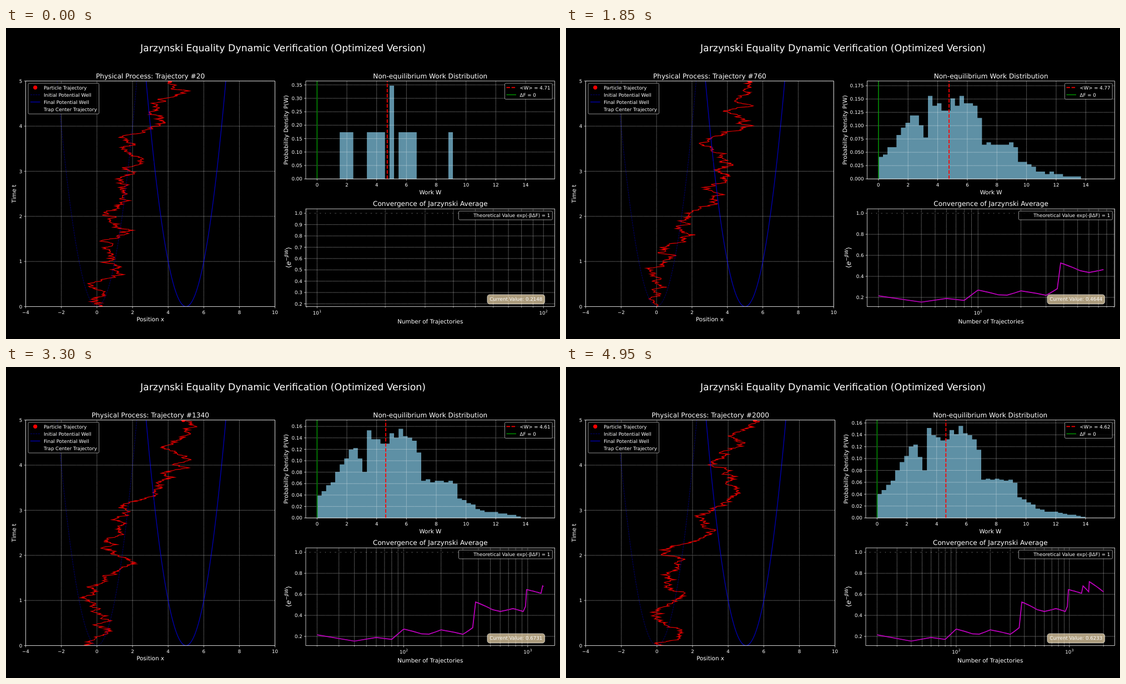
These frames come from a looping animation (998x561 px, 5 s). An HTML page with a canvas:

```html
<!DOCTYPE html>
<html lang="en">
<head>
<meta charset="utf-8">
<title>Jarzynski Equality Dynamic Verification</title>
<style>
html, body { margin: 0; height: 100%; overflow: hidden; background: #000; }
canvas { display: block; }
</style>
</head>
<body>
<canvas id="stage" width="998" height="561"></canvas>
<script>
const ctx = document.getElementById('stage').getContext('2d');
const STEPS = 100, STEP_MS = 50, BATCH = 20, BINS = 46, BIN = 0.304;
const PT = 998 / 16 / 72;   // a 16 inch wide figure
const SMALL = 10 * PT, LABEL = 12 * PT, TITLE = 14 * PT;
const TOP = 95.7, BOTTOM = 502.5;

// Key points [position, value], joined by straight lines.
const workShape = [[0, .04], [2, .053], [5, .093], [8, .13], [10, .08], [11, .15], [13, .13], [18, .15],
  [22, .118], [23, .068], [30, .06], [31, .036], [36, .013], [45, .002]];
const peakDensity = [[20, .347], [100, .2], [260, .176], [760, .175], [1040, .167], [1340, .163], [1720, .157], [2000, .157]];
const meanWork = [[20, 4.71], [520, 4.86], [1040, 4.66], [1340, 4.61], [2000, 4.62]];
const average = [[20, .2148], [40, .155], [60, .19], [80, .172], [100, .27], [150, .212], [200, .262], [300, .22],
  [360, .283], [380, .527], [520, .4543], [600, .437], [760, .4644], [920, .437], [960, .485], [980, .645],
  [1280, .61], [1320, .68], [1480, .625], [1500, .72], [2000, .6233]];

function along(points, at) {
  const i = Math.max(1, points.findIndex(([x]) => x >= at));
  const [x0, y0] = points[i - 1], [x1, y1] = points[i];
  return y0 + (y1 - y0) * (at - x0) / (x1 - x0);
}

function random(seed) {
  return () => {
    seed = (seed + 0x6D2B79F5) | 0;
    let v = Math.imul(seed ^ seed >>> 15, 1 | seed);
    v ^= v + Math.imul(v ^ v >>> 7, 61 | v);
    return ((v ^ v >>> 14) >>> 0) / 4294967296;
  };
}

// Overdamped particle in a harmonic trap whose centre moves at unit speed.
function trajectory(n) {
  const rand = random(n), dt = 0.01;
  const normal = () => 2 * (rand() + rand() + rand() - 1.5);
  let x = 0.7 * normal();
  return Array.from({ length: 501 }, (_, i) => {
    const here = x;
    x += 2 * (i * dt - x) * dt + Math.sqrt(2 * dt) * normal();
    return here;
  });
}

// Whole counts per bin, rough for few runs and smooth for many.
function workDensity(n) {
  const rand = random(11), runs = 0.945 * n * BIN, peak = along(peakDensity, n);
  return Array.from({ length: BINS }, (_, i) => {
    const expected = runs * along(workShape, i) * (1 + (2 * rand() - 1) * Math.sqrt(10 / n));
    return Math.min(peak, Math.floor(expected + rand()) / runs);
  });
}

function text(str, x, y, size = SMALL, align = 'center', style = '') {
  ctx.font = `${style} ${size}px "DejaVu Sans", sans-serif`;
  ctx.textAlign = align;
  ctx.fillStyle = '#fff';
  ctx.fillText(str, x, y + 0.365 * size);
}

function turned(x, y, draw) {
  ctx.save();
  ctx.translate(x, y);
  ctx.rotate(-Math.PI / 2);
  draw();
  ctx.restore();
}

function line(points, color, width, dash = []) {
  ctx.strokeStyle = color;
  ctx.lineWidth = width;
  ctx.setLineDash(dash);
  ctx.beginPath();
  points.forEach(([x, y]) => ctx.lineTo(x, y));
  ctx.stroke();
  ctx.setLineDash([]);
}

const dashes = width => [3.7 * width, 1.6 * width];
const number = (v, digits = 0) => v.toFixed(digits).replace('-', '\u2212');
const range = (from, to, step) =>
  Array.from({ length: Math.floor((to - from) / step + 1e-6) + 1 }, (_, i) => from + i * step);

function panel(left, top, right, bottom, [xMin, xMax], [yMin, yMax]) {
  return {
    left, top, right, bottom,
    x: v => left + (v - xMin) / (xMax - xMin) * (right - left),
    y: v => bottom - (v - yMin) / (yMax - yMin) * (bottom - top),
    clip(draw) {
      ctx.save();
      ctx.beginPath();
      ctx.rect(left, top, right - left, bottom - top);
      ctx.clip();
      draw();
      ctx.restore();
    }
  };
}

function gridX(p, v, tick = 3) {
  const x = p.x(v);
  line([[x, p.bottom], [x, p.top]], '#fff', 0.75, [0.75, 1.1]);
  line([[x, p.bottom], [x, p.bottom + tick]], '#fff', 0.7);
}

function gridY(p, v, digits) {
  const y = p.y(v);
  line([[p.left, y], [p.right, y]], '#fff', 0.75, [0.75, 1.1]);
  line([[p.left, y], [p.left - 3, y]], '#fff', 0.7);
  text(number(v, digits), p.left - 6.2, y, SMALL, 'right');
}

function frame(p, title, xLabel, labelY) {
  const middle = (p.left + p.right) / 2;
  ctx.strokeStyle = '#fff';
  ctx.lineWidth = 0.75;
  ctx.strokeRect(p.left, p.top, p.right - p.left, p.bottom - p.top);
  text(title, middle, p.top - 9.2, TITLE);
  text(xLabel, middle, labelY, LABEL);
}

function box(x, y, w, h, radius, fill, edge) {
  ctx.beginPath();
  ctx.roundRect(x, y, w, h, radius);
  ctx.fillStyle = fill;
  ctx.fill();
  ctx.strokeStyle = edge;
  ctx.lineWidth = PT;
  ctx.stroke();
}
const legend = (x, y, w, h) => box(x, y, w, h, 1.8, 'rgba(0,0,0,.8)', 'rgba(204,204,204,.8)');

function dot(x, y) {
  ctx.fillStyle = '#f00';
  ctx.beginPath();
  ctx.arc(x, y, 3.6, 0, 7);
  ctx.fill();
}

function drawProcess(n, right) {
  const p = panel(35.5, TOP, right, BOTTOM, [-4, 10], [0, 5]);
  for (const v of range(-4, 10, 2)) {
    gridX(p, v);
    text(number(v), p.x(v), 513);
  }
  for (const v of range(0, 5, 1)) gridY(p, v, 0);

  const well = center => range(-4, 10, 0.05).map(x => [p.x(x), p.y((x - center) ** 2)]);
  const initial = ['rgba(0,0,255,.5)', PT, dashes(PT)];
  const final = ['rgba(0,0,255,.72)', 1.5 * PT];
  const xs = trajectory(n);
  p.clip(() => {
    line(xs.map((x, i) => [p.x(x), p.y(i / 100)]), 'rgba(255,0,0,.9)', 1.2);
    dot(p.x(xs[500]), p.y(5));
    line(well(0), ...initial);
    line(well(5), ...final);
    line([[p.x(0), p.y(0)], [p.x(5), p.y(5)]], '#000', PT, [PT, 1.65 * PT]);
  });
  frame(p, 'Physical Process: Trajectory #' + n, 'Position x', 525.5);
  turned(14, 299, () => text('Time t', 0, 0, LABEL));

  legend(40, 99.7, 127.5, 55.3);
  dot(52.7, 107.3);
  line([[44, 120.5], [61.5, 120.5]], ...initial);
  line([[44, 133.5], [61.5, 133.5]], ...final);
  ['Particle Trajectory', 'Initial Potential Well', 'Final Potential Well', 'Trap Center Trajectory']
    .forEach((s, i) => text(s, 68, 107.4 + 13.05 * i, SMALL, 'left'));
}

function drawHistogram(n, left, yMax, step) {
  const p = panel(left, TOP, 988.6, 272.2, [-0.76, 15.96], [0, yMax]);
  const digits = step === 0.025 ? 3 : 2;
  ctx.fillStyle = 'rgb(94,144,165)';
  ctx.beginPath();
  workDensity(n).forEach((v, i) =>
    ctx.rect(p.x(i * BIN), p.y(v), p.x(BIN) - p.x(0), p.bottom - p.y(v)));
  ctx.fill();
  for (const v of range(0, 14, 2)) {
    gridX(p, v);
    text(number(v), p.x(v), 283);
  }
  for (const v of range(0, yMax, step)) gridY(p, v, digits);

  const mean = along(meanWork, n), width = 2 * PT;
  const meanLine = ['#f00', width, dashes(width)], zeroLine = ['#008000', width];
  const upright = v => [[p.x(v), p.bottom], [p.x(v), p.top]];
  line(upright(mean), ...meanLine);
  line(upright(0), ...zeroLine);
  frame(p, 'Non-equilibrium Work Distribution', 'Work W', 296);
  turned(digits === 3 ? 502 : 504.2, 184, () => text('Probability Density P(W)', 0, 0, LABEL));

  legend(898.5, 99.7, 85.7, 28.8);
  line([[901.5, 107.3], [919, 107.3]], ...meanLine);
  line([[901.5, 120.4], [919, 120.4]], ...zeroLine);
  text(`<W> = ${mean.toFixed(2)}`, 925.5, 107.4, SMALL, 'left');
  text('ΔF = 0', 925.5, 120.5, SMALL, 'left');
}

function powerLabel(x, factor, exponent) {
  const base = (factor > 1 ? factor + ' × ' : '') + '10';
  ctx.font = `${SMALL}px "DejaVu Sans", sans-serif`;
  const width = ctx.measureText(base).width, start = x - (width + 4.2) / 2;
  text(base, start, 514.3, SMALL, 'left');
  text(exponent, start + width + 0.4, 511, 0.7 * SMALL, 'left');
}

function drawAverage(n, left) {
  const runs = range(BATCH, n, BATCH), values = runs.map(run => along(average, run));
  const low = Math.min(...values), pad = (1 - low) * 0.05;
  const [from, to] = runs.length === 1 ? [1, 2] : [Math.log10(BATCH), Math.log10(n)];
  const margin = (to - from) * 0.05, xMin = from - margin, xMax = to + margin, span = xMax - xMin;
  const yMin = low - pad, yMax = 1 + pad;
  const p = panel(left, 326.2, 988.6, BOTTOM, [xMin, xMax], [yMin, yMax]);

  for (let exponent = 0; exponent < 4; exponent++) {
    for (let factor = 1; factor < 10; factor++) {
      const v = exponent + Math.log10(factor);
      if (v < xMin || v > xMax) continue;
      gridX(p, v, factor === 1 ? 3 : 1.7);
      const labelled = span <= 0.4 || span <= 1 && [2, 3, 4, 6].includes(factor);
      if (factor === 1 || labelled) powerLabel(p.x(v), factor, exponent);
    }
  }
  const step = (yMax - yMin) / 0.1 <= 9 ? 0.1 : 0.2;
  for (const v of range(Math.ceil(yMin / step) * step, yMax, step)) gridY(p, v, 1);

  line(values.map((v, i) => [p.x(Math.log10(runs[i])), p.y(v)]), '#bf00bf', 2 * PT);
  line([[p.left, p.y(1)], [p.right, p.y(1)]], '#000', 2 * PT, dashes(2 * PT));
  frame(p, 'Convergence of Jarzynski Average', 'Number of Trajectories', 529);
  turned(508.5, 414, () => {
    text('⟨', -19, 0, TITLE, 'left');
    text('e', -14.2, 0, TITLE, 'left', 'italic');
    text('\u2212βW', -6.6, -3.6, 0.7 * TITLE, 'left', 'italic');
    text('⟩', 19, 0, TITLE, 'right');
  });

  legend(815.5, 330.2, 168.8, 15.8);
  text('Theoretical Value exp(-βΔF) = 1', 980.3, 338, SMALL, 'right');
  box(867, 480.9, 103.6, 17, 4.3, 'rgba(245,222,179,.7)', 'rgba(255,255,255,.7)');
  text('Current Value: ' + values.at(-1).toFixed(4), 966.3, 489, SMALL, 'right');
}

function draw(n) {
  ctx.fillStyle = '#000';
  ctx.fillRect(0, 0, 998, 561);
  ctx.textRendering = 'geometricPrecision';
  text('Jarzynski Equality Dynamic Verification (Optimized Version)', 499, 36, 20 * PT);

  const yMax = along(peakDensity, n) * 1.05;
  const step = [0.02, 0.025, 0.05].find(s => yMax / s <= 9);
  const wide = step === 0.025;   // three-digit tick labels push the panels apart
  const left = wide ? 542.6 : 540;
  drawProcess(n, wide ? 482.2 : 484.6);
  drawHistogram(n, left, yMax, step);
  drawAverage(n, left);
}

let shown = -1;
function tick() {
  const index = Math.floor(performance.now() / STEP_MS) % STEPS;
  if (index !== shown) draw(BATCH * (index + 1));
  shown = index;
  requestAnimationFrame(tick);
}
tick();
</script>
</body>
</html>
```
